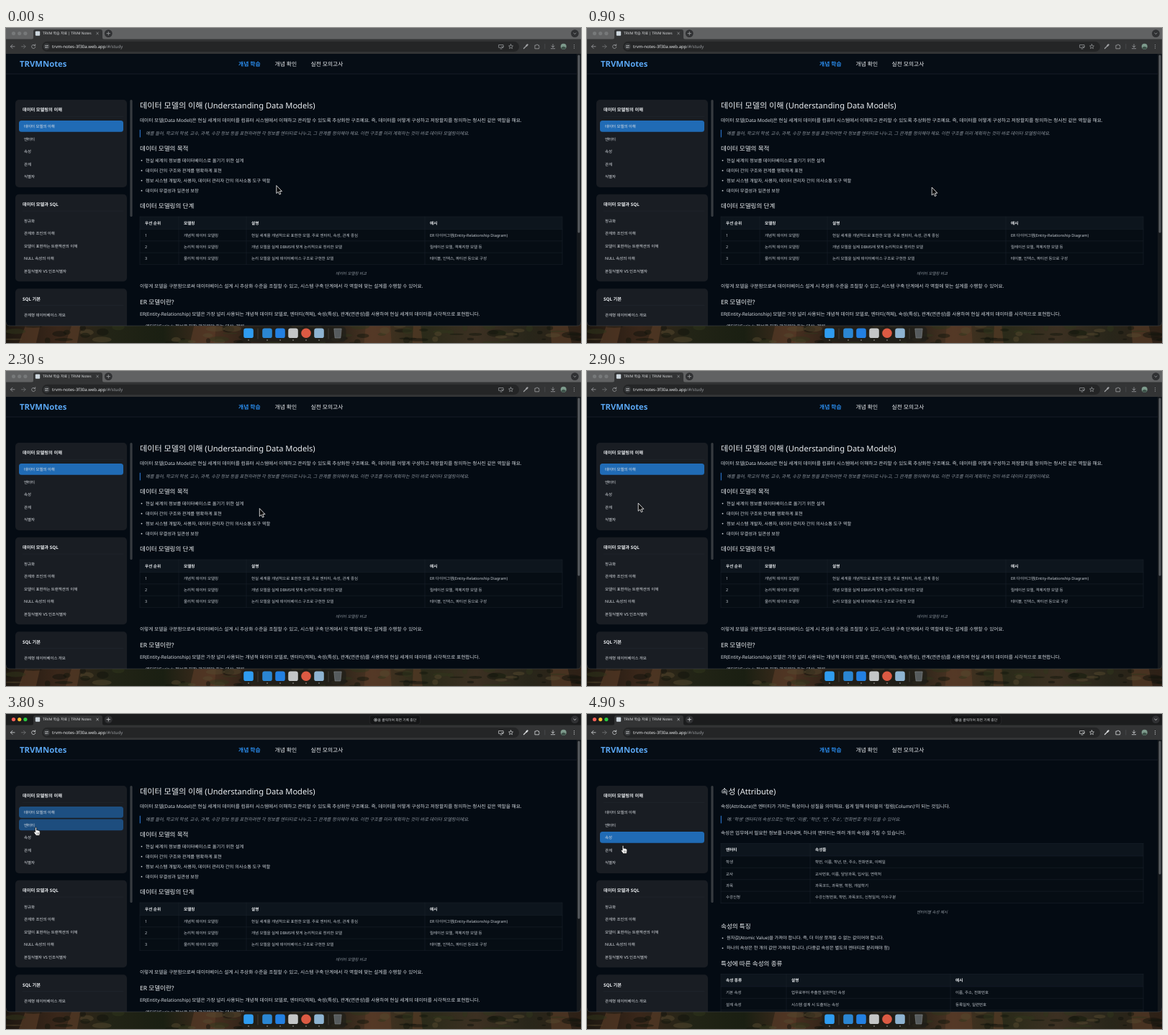
An HTML page that plays this animation: 799 px wide and 439 px high, repeating every 5000 ms.

```html
<!DOCTYPE html>
<html lang="ko">
<head>
<meta charset="utf-8">
<title>TRVM Notes</title>
<style>
html, body { margin: 0; width: 100%; height: 100%; overflow: hidden; background: #040b13; }
svg { display: block; width: 799px; height: 439px; }
text { font-family: "Noto Sans", "Noto Sans CJK KR", sans-serif; text-rendering: geometricPrecision; white-space: pre; }
.line { fill: none; stroke-linecap: round; stroke-linejoin: round; }
</style>
</head>
<body>
<svg id="stage" viewBox="0 0 799 439" xmlns="http://www.w3.org/2000/svg"></svg>
<script>
const BODY = '#d3d8de', HEAD = '#edf0f3', CELL = '#c3c9d0', MUTED = '#8c949d', EDGE = '#1c252f';

// y is the middle of the line of text
const text = (x, y, size, s, fill = BODY, more = '') =>
  `<text x="${x}" y="${(y + size * 0.37).toFixed(2)}" font-size="${size}" fill="${fill}" ${more}>${s}</text>`;
const box = (x, y, w, h, fill, r = 0, more = '') =>
  `<rect x="${x}" y="${y}" width="${w}" height="${h}" rx="${r}" fill="${fill}" ${more}/>`;
const dot = (x, y, r, fill, more = '') => `<circle cx="${x}" cy="${y}" r="${r}" fill="${fill}" ${more}/>`;
const line = (d, color, w = 0.5) => `<path class="line" d="${d}" stroke="${color}" stroke-width="${w}"/>`;
const group = (id, s) => `<g id="${id}">${s}</g>`;
const bold = 'font-weight="600"', medium = 'font-weight="500"', italic = 'font-style="italic"';

const title = s => text(186, 107.5, 11.1, s, HEAD, medium);
const para = (y, s) => text(186, y, 6.66, s);
const heading = (y, s) => text(186, y, 8.57, s, HEAD, medium);
const bullet = (y, s) => dot(188.5, y + 0.3, 0.9, BODY) + text(194, y, 6.25, s);
const caption = (y, s) => text(479.5, y, 5.45, s, MUTED, italic + ' text-anchor="middle"');
const quote = s => box(185.7, 141.8, 1.4, 10.6, '#2463ad') + text(194, 147, 6.28, s, MUTED, italic);
const thumb = h => box(794.5, 37.5, 3, h, '#585c60', 1.5);

function table(y, cols, rows) {
  const top = i => y + (i ? 17.4 + (i - 1) * 16.4 : 0), bottom = top(rows.length);
  let s = box(186, y, 587, bottom - y, '#060d14') + box(186, y, 587, 17.4, '#0d151d');
  rows.forEach((row, i) => {
    s += line(`M186 ${top(i)}H773`, EDGE);
    row.split('|').forEach((cell, j) => {
      s += text(cols[j] + 7, (top(i) + top(i + 1)) / 2, i ? 5.47 : 5.6, cell, i ? CELL : HEAD, i ? '' : bold);
    });
  });
  s += line(`M186 ${bottom}H773`, EDGE);
  for (const x of [...cols, 773]) s += line(`M${x} ${y}V${bottom}`, EDGE);
  return s;
}

const modelPage =
  title('데이터 모델의 이해 (Understanding Data Models)') +
  para(129, '데이터 모델(Data Model)은 현실 세계의 데이터를 컴퓨터 시스템에서 이해하고 관리할 수 있도록 추상화한 구조예요. 즉, 데이터를 어떻게 구성하고 저장할지를 정의하는 청사진 같은 역할을 해요.') +
  quote('예를 들어, 학교의 학생, 교수, 과목, 수강 정보 등을 표현하려면 각 정보를 엔터티로 나누고, 그 관계를 정의해야 해요. 이런 구조를 미리 계획하는 것이 바로 데이터 모델링이에요.') +
  heading(168, '데이터 모델의 목적') +
  bullet(184.3, '현실 세계의 정보를 데이터베이스로 옮기기 위한 설계') +
  bullet(198.4, '데이터 간의 구조와 관계를 명확하게 표현') +
  bullet(212.3, '정보 시스템 개발자, 사용자, 데이터 관리자 간의 의사소통 도구 역할') +
  bullet(226.4, '데이터 무결성과 일관성 보장') +
  heading(248, '데이터 모델링의 단계') +
  table(263, [186, 240, 334, 582], [
    '우선 순위|모델링|설명|예시',
    '1|개념적 데이터 모델링|현실 세계를 개념적으로 표현한 모델. 주로 엔터티, 속성, 관계 중심|ER 다이어그램(Entity-Relationship Diagram)',
    '2|논리적 데이터 모델링|개념 모델을 실제 DBMS에 맞게 논리적으로 정리한 모델|릴레이션 모델, 객체지향 모델 등',
    '3|물리적 데이터 모델링|논리 모델을 실제 데이터베이스 구조로 구현한 모델|테이블, 인덱스, 파티션 등으로 구성']) +
  caption(342, '데이터 모델링 비교') +
  para(359.5, '이렇게 모델을 구분함으로써 데이터베이스 설계 시 추상화 수준을 조절할 수 있고, 시스템 구축 단계에서 각 역할에 맞는 설계를 수행할 수 있어요.') +
  heading(382, 'ER 모델이란?') +
  para(399, 'ER(Entity-Relationship) 모델은 가장 널리 사용되는 개념적 데이터 모델로, 엔터티(객체), 속성(특성), 관계(연관성)를 사용하여 현실 세계의 데이터를 시각적으로 표현합니다.') +
  bullet(416, '엔터티(Entity): 정보로 저장 관리해야 하는 대상, 객체') +
  thumb(248);

const attributePage =
  title('속성 (Attribute)') +
  para(129, "속성(Attribute)은 엔터티가 가지는 특성이나 성질을 의미해요. 쉽게 말해 테이블의 '컬럼(Column)'이 되는 것입니다.") +
  quote("예: '학생' 엔터티의 속성으로는 '학번', '이름', '학년', '반', '주소', '전화번호' 등이 있을 수 있어요.") +
  para(166, '속성은 업무에서 필요한 정보를 나타내며, 하나의 엔터티는 여러 개의 속성을 가질 수 있습니다.') +
  table(180.5, [186, 310], [
    '엔터티|속성들',
    '학생|학번, 이름, 학년, 반, 주소, 전화번호, 이메일',
    '교사|교사번호, 이름, 담당과목, 입사일, 연락처',
    '과목|과목코드, 과목명, 학점, 개설학기',
    '수강신청|수강신청번호, 학번, 과목코드, 신청일자, 이수구분']) +
  caption(275.5, '엔터티별 속성 예시') +
  heading(295.5, '속성의 특징') +
  bullet(312, '원자값(Atomic Value)을 가져야 합니다. 즉, 더 이상 쪼개질 수 없는 값이어야 합니다.') +
  bullet(326, '하나의 속성은 한 개의 값만 가져야 합니다. (다중값 속성은 별도의 엔터티로 분리해야 함)') +
  heading(348, '특성에 따른 속성의 종류') +
  table(362.5, [186, 277, 505], [
    '속성 종류|설명|예시',
    '기본 속성|업무로부터 추출한 일반적인 속성|이름, 주소, 전화번호',
    '설계 속성|시스템 설계 시 도출되는 속성|등록일자, 일련번호',
    '파생 속성|다른 속성으로부터 계산된 속성|나이, 총점']) +
  thumb(186);

const card = (y, h, name) => box(13, y, 155, h, '#191d23', 5) +
  text(23, y + 14, 6.25, name, HEAD, bold) + line(`M23 ${y + 23.3}H163`, '#2a2f36', 0.4);
const items = (y, names) => names.map((s, i) => text(25, y + i * 17.5, 5.45, s, '#dde1e6')).join('');
const pills = [0, 1, 2].map(i =>
  box(18, 129 + i * 17.5, 145, 15.8, '#206bb5', 3.5, `id="pill${i}"`)).join('');
const sidebar =
  card(100, 122, '데이터 모델링의 이해') + pills +
  items(137, ['데이터 모델의 이해', '엔터티', '속성', '관계', '식별자']) +
  card(231.8, 121.5, '데이터 모델과 SQL') +
  items(268.5, ['정규화', '관계와 조인의 이해', '모델이 표현하는 트랜잭션의 이해', 'NULL 속성의 이해', '본질식별자 VS 인조식별자']) +
  card(363.3, 80, 'SQL 기본') + items(400, ['관계형 데이터베이스 개요']) +
  box(172.4, 100, 3.2, 163, '#373b40', 1.6);

const site =
  box(0, 36, 799, 379, '#040b13') + box(0, 36, 793, 28, '#060d15') + line('M0 64H793', '#1d252e', 0.7) +
  text(19, 50.3, 11.3, 'TRVMNotes', '#5aa6f2', bold) +
  text(323, 49.8, 7.75, '개념 학습', '#2b8ef0', bold) +
  text(373.5, 49.8, 7.75, '개념 확인', HEAD, medium) +
  text(423.5, 49.8, 7.75, '실전 모의고사', HEAD, medium) +
  sidebar + box(793, 36, 6, 379, '#15191d') +
  group('model', modelPage) + group('attribute', attributePage);

const icons = c =>
  line('M12 25.8H6.5M9 23.2L6.4 25.8L9 28.4', c, 0.8) +
  line('M21.5 25.8H27M24.5 23.2L27.1 25.8L24.5 28.4', '#77797b', 0.8) +
  line('M40.2 24.2A2.6 2.6 0 1 0 40.8 26.4M40.7 22.7V24.6H38.8', c, 0.8) +
  line('M685 23.5H691V27.3H685ZM687 29H689M688.5 25.5L690 27L691.5 25.5', c, 0.7) +
  line('M701.5 22.8L702.4 24.8L704.5 25L702.9 26.5L703.4 28.6L701.5 27.5L699.6 28.6L700.1 26.5L698.5 25L700.6 24.8Z', c, 0.7) +
  line('M719.5 28.5L723.5 24.5', c, 1.3) + line('M723.3 24.6L724.6 23.3', c, 2.2) +
  line('M735.3 24H737A1 1 0 0 1 739 24H740.6V25.7A.9 .9 0 0 1 740.6 27.4V28.8H735.3Z', c, 0.8) +
  line('M760 22.8V26.7M758 25L760 27L762 25M757.3 28.7H762.7', c, 0.8) +
  [23.5, 25.8, 28.1].map(y => dot(789.5, y, 0.6, c)).join('') +
  line('M125.8 6.2L128.4 8.8M128.4 6.2L125.8 8.8', c, 0.7) +
  line('M142.3 5.3V9.9M140 7.6H144.6', c, 0.8) +
  line('M788.8 7L790.4 8.5L792 7', c, 0.8);

const lights = colors => colors.map((c, i) => dot(10.5 + i * 8.2, 7.6, 2.6, c)).join('');
const browser =
  `<rect id="frame" width="799" height="17"/>` + box(0, 15.5, 799, 20.5, '#333435') +
  `<path d="M35 16Q38 16 38 13V5Q38 2 41 2H131Q134 2 134 5V13Q134 16 137 16Z" fill="#333435"/>` +
  box(50, 18.8, 663, 14.2, '#242526', 7.1) + dot(56.5, 25.8, 4.6, '#37393b') +
  line('M54.5 24.6H56.3M58 24.6H58.5M54.5 27H55M56.8 27H58.5', '#d5d6d8', 0.7) +
  dot(57.2, 24.6, 0.7, '#d5d6d8') + dot(55.8, 27, 0.7, '#d5d6d8') +
  dot(142.3, 7.6, 5.4, '#303133') + dot(790.4, 7.6, 5.4, '#303133') +
  box(40.8, 4.4, 6.4, 6.4, '#cdd6dd', 1) +
  text(51, 7.4, 4.95, 'TRVM 학습 자료 | TRVM Notes', '#dcdee0') +
  text(64, 25.5, 6, 'trvm-notes-3f30a.web.app<tspan fill="#989b9f">/#/study</tspan>', '#e8eaec', medium) +
  line('M748.8 22.5V29', '#55585a', 0.6) +
  dot(774.7, 25.8, 4, '#7d9a8c') + `<path d="M771.3 27.8Q774.7 23.6 778.1 27.8A4 4 0 0 1 771.3 27.8Z" fill="#3d5249"/>` +
  group('idle', lights(['#77797a', '#77797a', '#77797a']) + icons('#a0a2a5')) +
  group('focused', lights(['#fe5f57', '#febc2e', '#28c840']) + icons('#d9dbdd') +
    box(505.3, 1.8, 70.4, 13, '#151617', 4, 'stroke="#343536" stroke-width=".5"') +
    dot(513.6, 8.2, 2.1, 'none', 'stroke="#d6d8da" stroke-width=".6"') + dot(513.6, 8.2, 1, '#d6d8da') +
    text(516.6, 8.2, 4.8, '을 클릭하여 화면 기록 중단', '#d0d2d4'));

const woods = ['#1d1710', '#3a271a', '#222416', '#1a1f12', '#452e1f', '#241c14',
  '#1c1b13', '#4a3423', '#2a2a19', '#3c3022', '#28261a', '#2e2016'];

// dark woodland: a few wide trunks with soft foliage between them
function forest() {
  let seed = 11, s = box(0, 405, 799, 34, 'url(#woods)');
  const rand = () => (seed = seed * 16807 % 2147483647) / 2147483647;
  const leaves = ['#12160c', '#2f361c', '#0f120b', '#54472d'];
  for (const [x, w] of [[28, 20], [92, 12], [262, 30], [500, 34], [566, 10], [756, 24]])
    s += `<path d="M${x} 412h${w}l${(x - 400) / 60} 27h${-w - 4}Z" fill="#5c3d28" opacity=".6"/>`;
  for (let i = 0; i < 90; i++)
    s += `<ellipse cx="${rand() * 799}" cy="${415 + rand() * 24}" rx="${3 + rand() * 11}" ry="${1 + rand() * 4}" fill="${leaves[i % 4]}" opacity=".5"/>`;
  return s;
}

const dock =
  box(326.5, 416, 146, 21.5, '#201f1a', 5.5, 'opacity=".75"') +
  line('M350 419V433M448 419V433', '#5e5a55', 0.5) +
  [[337, '#2f9cf0'], [363, '#2b86d2'], [381, '#2380e2'], [399, '#c4c6c7'], [435, '#8eb4d2']]
    .map(([x, c]) => box(x - 6.8, 418.5, 13.6, 13.6, c, 3.2)).join('') +
  dot(417, 425.3, 6.8, '#dc5a43') +
  [337, 363, 381, 399, 417, 435].map(x => dot(x, 435, 0.7, '#c9c6c2')).join('') +
  '<path d="M455.8 419H466.2L464.9 432H457.1Z" fill="#565b5d" stroke="#85898c" stroke-width=".6"/>';

const arrow = '<path d="M0 0V11L2.5 8.8L4.2 12.5L6 11.7L4.4 8.1H7.7Z" fill="#080808" stroke="#fff" stroke-width=".8" stroke-linejoin="round"/>';
const hand = '<path d="M-.9 .9Q-.9 0 0 0T.9 .9V4Q2 3.4 2.6 4.2Q3.7 3.7 4.2 4.7Q5.7 4.4 5.7 6V8.4Q5.5 10 4.8 11.3H.2Q-.7 9.6 -2.5 7.5Q-3 6.4 -2.1 6.1Q-1.4 6 -.9 6.9Z" fill="#fff" stroke="#111" stroke-width=".7" stroke-linejoin="round"/>' +
  line('M1.4 7.3V9.6M2.7 7.3V9.6M4 7.3V9.6', '#222', 0.4);

const stage = document.getElementById('stage');
stage.innerHTML =
  `<defs><linearGradient id="woods">${woods.map((c, i) => `<stop offset="${i / 11}" stop-color="${c}"/>`).join('')}</linearGradient>
  <clipPath id="window"><rect y="-10" width="799" height="425" rx="5"/></clipPath></defs>` +
  forest() + dock + `<g clip-path="url(#window)">${site}${browser}</g>` +
  line('M0 410Q0 415 5 415H794Q799 415 799 410', '#3f4245', 0.6) +
  group('arrow', arrow) + group('hand', hand);

const $ = id => document.getElementById(id);
const show = (id, on) => { $(id).style.display = on ? '' : 'none'; };

// eased value between [time, value] keys
function track(t, keys) {
  let i = 0;
  while (i < keys.length - 1 && keys[i + 1][0] <= t) i++;
  const [t0, a] = keys[i], [t1, b] = keys[i + 1] || [t0 + 1, a];
  const k = Math.max(0, Math.min(1, (t - t0) / (t1 - t0)));
  return a + (b - a) * k * k * (3 - 2 * k);
}

const pathX = [[0, 375.8], [900, 479.2], [1700, 505], [1900, 505], [2900, 71.2], [3500, 41.5], [3800, 41.5], [4200, 51.3], [4900, 50]];
const pathY = [[0, 219.5], [900, 222], [1700, 195.5], [1900, 195.5], [2900, 184.2], [3500, 158], [3800, 158], [4200, 169.7], [4900, 183.3]];
const levels = [
  [[0, 1], [3700, 1], [3950, 0]],
  [[3300, 0], [3500, 0.42], [3700, 0.42], [3950, 1], [4100, 1], [4200, 0.86], [4400, 0]],
  [[4000, 0], [4200, 0.66], [4400, 1]]
];

function draw(now) {
  const t = Math.floor(now % 5000 / 100) * 100, active = t >= 3200, attribute = t >= 4100;
  $('frame').setAttribute('fill', active ? '#1b1c1d' : '#616263');
  show('idle', !active);
  show('focused', active);
  show('model', !attribute);
  show('attribute', attribute);
  show('arrow', !active);
  show('hand', active);
  levels.forEach((keys, i) => $('pill' + i).setAttribute('opacity', track(t, keys)));
  const place = `translate(${track(t, pathX)} ${track(t, pathY)})`;
  $('arrow').setAttribute('transform', place);
  $('hand').setAttribute('transform', place);
}

const start = performance.now();
function loop() {
  draw(performance.now() - start);
  requestAnimationFrame(loop);
}
loop();
</script>
</body>
</html>
```
